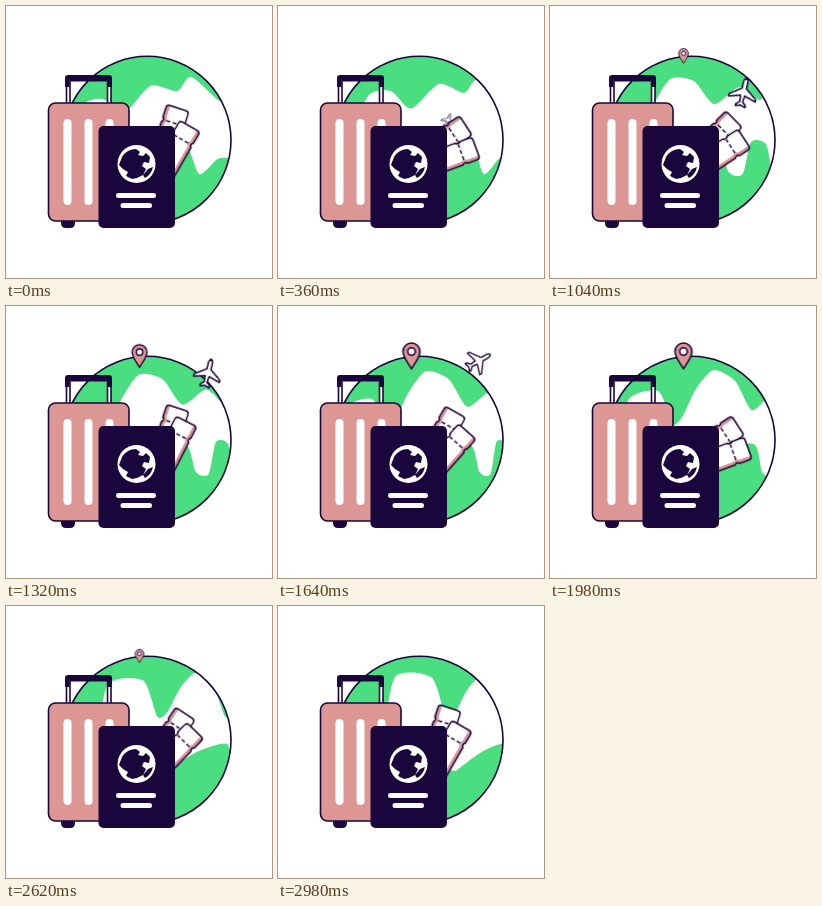
Animation, 266 px wide and 272 px high, one loop 3000 ms. Source, as an HTML page:

```html
<!DOCTYPE html>
<html lang="en">
<head>
<meta charset="utf-8">
<title>Travel</title>
<style>
html, body { margin: 0; width: 100%; height: 100%; overflow: hidden; background: #fff; }
svg { display: block; width: 266px; height: 272px; }
:root { --ink: #1a063d; --pink: #dc9795; --green: #4ade80; }
.ink { fill: var(--ink); }
.pink { fill: var(--pink); }
.white { fill: #fff; }
.line { stroke: var(--ink); stroke-width: 1.6; stroke-linejoin: round; }
.bars { stroke: #fff; stroke-linecap: round; fill: none; }

.back { animation: back 1500ms ease-in-out infinite; }
.front { animation: front 1500ms ease-in-out infinite; }
.plane { animation: plane 3000ms linear infinite; }
.pin { animation: pin 3000ms linear infinite; }

/* Tickets swing out, rest and swing back, twice per loop. */
@keyframes back {
  0%, 88%, 100% { transform: translate(162px, 132.5px) rotate(18deg); }
  25%, 58% { transform: translate(161px, 137px) rotate(57deg); }
}
@keyframes front {
  0%, 100% { transform: translate(168px, 148px) rotate(30deg); }
  25%, 58% { transform: translate(168px, 153px) rotate(70deg); }
  88% { transform: translate(166px, 144px) rotate(27deg); }
}
@keyframes plane {
  0%, 7% { transform: translate(166px, 128px) rotate(25deg) scale(0); }
  12% { transform: translate(170px, 114px) rotate(22deg) scale(.45); }
  26.67% { transform: translate(186px, 103px) rotate(12deg) scale(1); }
  44% { transform: translate(202px, 67px) rotate(14deg) scale(.95); }
  54.67% { transform: translate(201px, 55px) rotate(60deg) scale(.88); }
  66%, 100% { transform: translate(184px, 44px) rotate(90deg) scale(0); }
}
@keyframes pin {
  0%, 20% { transform: translate(133.5px, 50px) scale(0); }
  26.67% { transform: translate(133.5px, 50px) scale(.3); }
  44% { transform: translate(133.5px, 50px) scale(.87); }
  53%, 81% { transform: translate(133.5px, 50px) scale(1); }
  94%, 100% { transform: translate(133.5px, 50px) scale(0); }
}
</style>
</head>
<body>
<svg viewBox="0 0 266 272">
  <defs>
    <clipPath id="disc"><circle cx="141.3" cy="134" r="83.7"/></clipPath>
    <g id="ticket">
      <path class="pink line" d="M-11.5 45V-14a3 3 0 0 0 0-5V-29q0-3 3-3H8.500q3 0 3 3v10a3 3 0 0 0 0 5V45Z"/>
      <path class="white" d="M-8 45V-13q2-3.500 0-7V-31H8q2.700 0 2.700 2.500V-20q-3 3.500 0 7V45Z"/>
      <path class="line" d="M-7-16.500H9" stroke-dasharray="4 2.500"/>
    </g>
  </defs>

  <circle cx="141.3" cy="134" r="83.7" fill="var(--green)"/>
  <path id="land" class="white" clip-path="url(#disc)"/>
  <circle class="line" cx="141.3" cy="134" r="83.7" fill="none"/>

  <path class="plane white line" d="M0-15q2 1 2.200 4V-4L14 4.500V7L2.200 3.500 1.500 10 5 13v2L0 13.500-5 15V13L-1.500 10-2.200 3.500-14 7V4.500L-2.200-4V-11q.2-3 2.200-4Z"/>
  <g class="back"><use href="#ticket"/></g>
  <g class="front"><use href="#ticket" transform="scale(-1 1)"/></g>

  <g class="pin">
    <path class="pink line" d="M0 13C-3 7-8.500 2-8.500-4.500a8.500 8.500 0 0 1 17 0C8.500 2 3 7 0 13Z"/>
    <circle class="white line" cy="-4.500" r="3.700"/>
  </g>

  <g id="suitcase">
    <path class="white line" d="M60.500 76h3.500v22h-3.500ZM101.500 76h3.500v22h-3.500Z"/>
    <path class="ink" d="M59 81V72q0-3 3-3H103q3 0 3 3v9h-4.500V75.500H63.500V81Z"/>
    <path class="ink" d="M55 213h14v4q0 5-5 5h-4q-5 0-5-5Z"/>
    <rect class="pink line" x="42.500" y="97" width="80.500" height="118" rx="7"/>
    <path class="bars" stroke-width="8" d="M61.500 117v78M82.500 117v78M103.500 117v78"/>
  </g>

  <g id="passport">
    <rect class="ink" x="92.500" y="120" width="76.500" height="102" rx="5"/>
    <circle class="white" cx="130.500" cy="158" r="19"/>
    <path class="ink" d="M116 151q5-8 14-8l4 3-2 3 5 1 3-3 4 4-1 6-5-1-2 4 4 3-3 6-6 3-5 1-6-3 2-4-5-3-4-4ZM142 163l5-2q-2 8-8 11l-2-3Z"/>
    <path class="bars" stroke-width="5" d="M112.500 189.500h35M117 199.500h26.500"/>
  </g>
</svg>
<script>
const LOOP = 3;      // seconds
const SPIN = 0.51;   // radians per second
const land = document.getElementById('land');

// Coastlines as [longitude, height]; the globe turns them to the right.
const north = [
  [-2.6, 100], [-1.95, 102], [-1.78, 60], [-1.38, 71], [-1.22, 110], [-1.1, 105], [-.96, 82], [-.76, 64],
  [-.5, 73], [-.27, 98], [.04, 78], [.34, 85], [.51, 69], [.9, 84], [1.3, 85]
];
const south = [
  [1.3, 148], [.9, 153], [.62, 168], [.45, 138], [.2, 136],
  [.08, 168], [-.1, 166], [-.24, 138], [-.75, 146], [-1.1, 165]
];

// Longitude to screen x, seen from the side of a sphere.
const project = angle => 141 + 90 * Math.sin(Math.max(-1.57, Math.min(1.57, angle)));

// Northern parallels arch towards the pole.
const arch = x => 0.0045 * (x - 165) ** 2;

// Soft curve through the given points.
function curve(pts) {
  let d = 'M' + pts[0];
  for (let i = 0; i < pts.length - 1; i++) {
    const p = pts[i], q = pts[i + 1];
    const before = pts[i - 1] || p, after = pts[i + 2] || q;
    const c1 = p.map((v, n) => v + (q[n] - before[n]) / 8);
    const c2 = q.map((v, n) => v - (after[n] - p[n]) / 8);
    d += `C${c1} ${c2} ${q}`;
  }
  return d + 'Z';
}

function draw() {
  const turn = SPIN * (performance.now() / 1000 % LOOP);
  const top = north.map(([u, y]) => {
    const x = project(u + turn);
    return [x, y + arch(x)];
  });
  const bottom = south.map(([u, y]) => [project(u + turn), y]);
  land.setAttribute('d', curve([...top, ...bottom]));
  requestAnimationFrame(draw);
}
draw();
</script>
</body>
</html>
```
